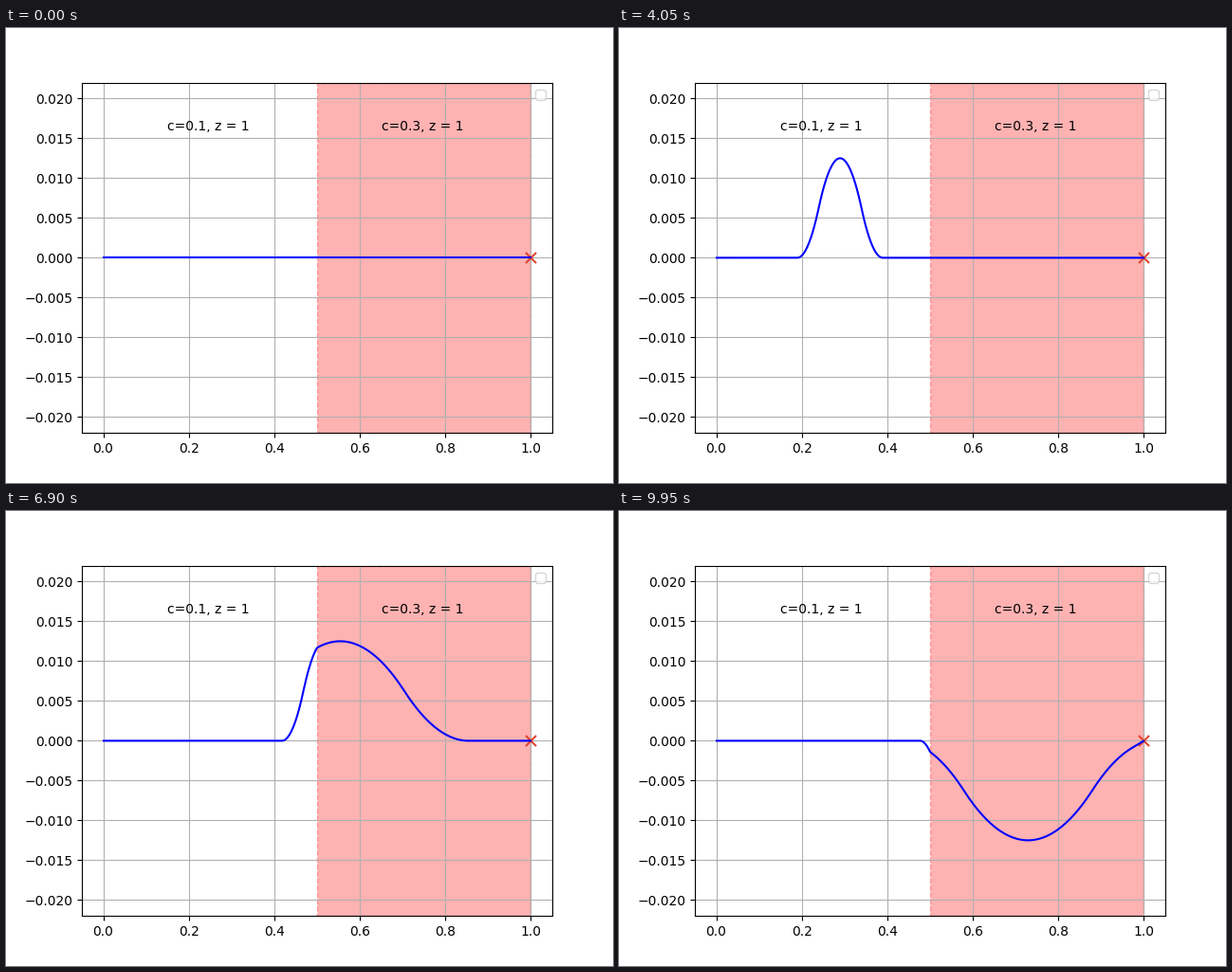
These frames come from a looping animation (640 by 480 pixels, 10 s). A matplotlib script:

```python
import numpy as np
import matplotlib.pyplot as plt
from matplotlib.animation import FuncAnimation

FRAMES, INTERVAL = 200, 50
C1, C2, MID = 0.1, 0.3, 0.5      # wave speeds and the interface between them
PEAK = 0.0125
PUSH = 0.5                       # travel time from the left wall to the push point

# Solver time at a few steps: idle start, quick growth, then nearly steady.
KEYS = [0, 14, 22, 31, 43, 56, 81, 98, 124, 152, 170, 199]
TIMES = [0, 0, 0.62, 1.2, 1.84, 2.43, 3.395, 4.06, 5.1, 6.26, 6.97, 8.07]

x = np.linspace(0.001, 0.999, 500)


def travel_time(pos):
    return np.minimum(pos, MID) / C1 + np.maximum(pos - MID, 0) / C2


def ramp(tau):
    """Integral of a triangular push lasting one second."""
    tau = np.clip(tau, 0, 1)
    return np.where(tau < 0.5, 2 * tau**2, 1 - 2 * (1 - tau)**2)


def pulse(t, s):
    """Direct wave plus its inverted echo from the left wall."""
    return ramp(t - np.abs(s - PUSH)) - ramp(t - s - PUSH)


direct = travel_time(x)
echo = 2 * travel_time(1.0) - direct    # path by way of the right wall


def wave(t):
    return PEAK * (pulse(t, direct) - pulse(t, echo))


fig, ax = plt.subplots(figsize=(6.4, 4.8), dpi=100)
ax.set_xlim(-0.05, 1.05)
ax.set_ylim(-0.022, 0.022)
ax.grid(True)
ax.axvspan(MID, 1, color="red", alpha=0.3, linestyle="--")
ax.scatter([1], [0], s=64, marker="x", color="#e0452f", linewidth=1.5, zorder=2)
ax.text(0.15, 0.016, f"c={C1}, z = 1")
ax.text(0.65, 0.016, f"c={C2}, z = 1")
ax.legend(handles=[], loc="upper right")
line, = ax.plot(x, np.zeros_like(x), color="blue")


def update(i):
    line.set_ydata(wave(np.interp(i, KEYS, TIMES)))
    return line,


anim = FuncAnimation(fig, update, frames=FRAMES, interval=INTERVAL,
                     repeat=True, repeat_delay=0)
plt.show()
```
